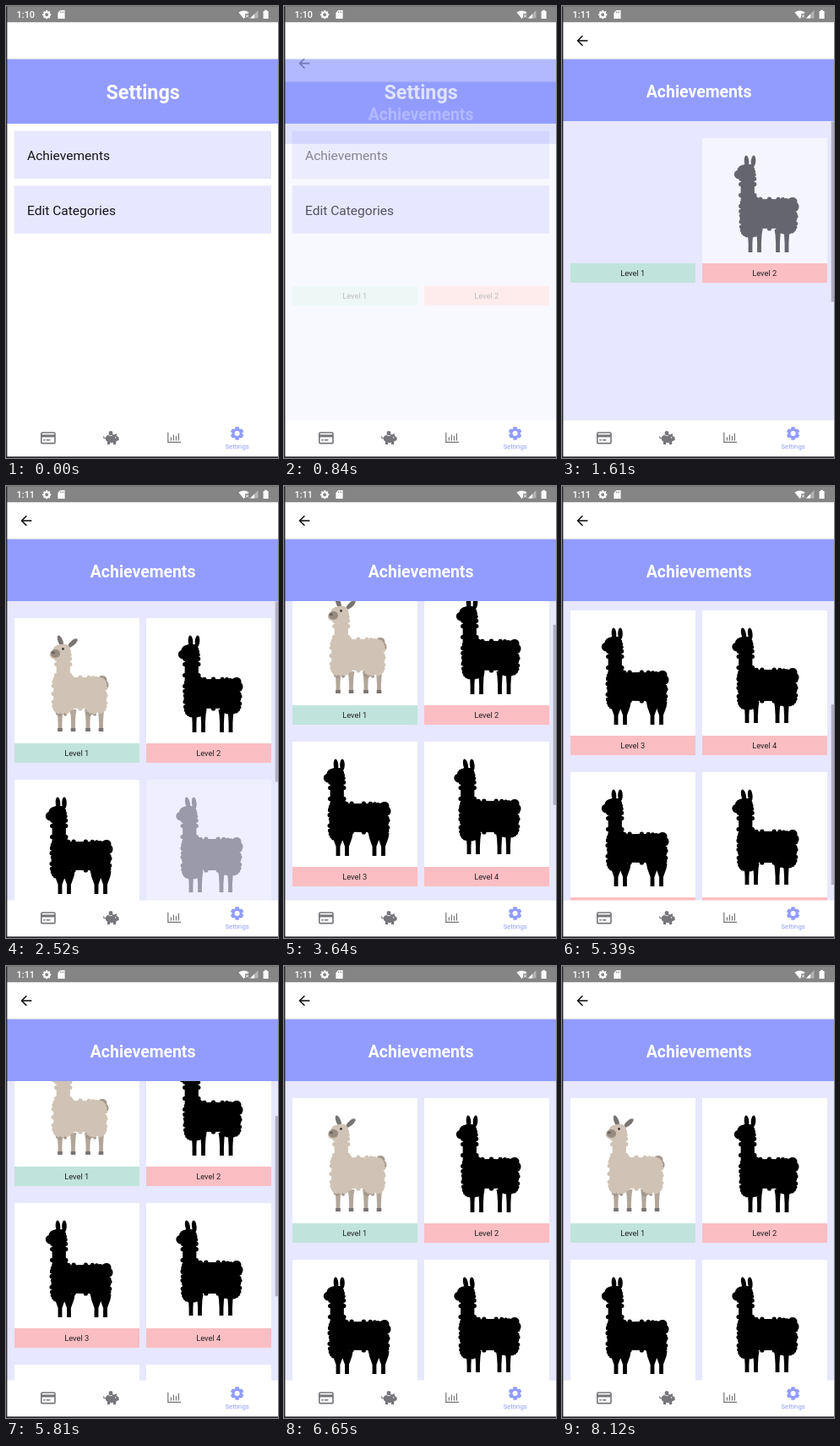
Recreate the animation shown at these times as an HTML page with a canvas. Size 322 by 534 pixels, loop 8.54 s.

```html
<!DOCTYPE html>
<html lang="en">
<head>
<meta charset="utf-8">
<title>Achievements</title>
<style>
html, body { margin: 0; width: 100%; height: 100%; overflow: hidden; background: #fff; }
canvas { display: block; width: 322px; height: 534px; }
</style>
</head>
<body>
<canvas id="stage"></canvas>
<script>
const W = 322, H = 534, LOOP = 8540, STEP = 70;
const BLUE = '#929cff', PALE = '#e7e7ff', GREY = '#75757a', EDGE = '#2a2a2e';
const dpr = window.devicePixelRatio || 1;
const stage = document.getElementById('stage');
const layer = document.createElement('canvas');
const [screen, sheet] = [stage, layer].map(c => {
  c.width = W * dpr;
  c.height = H * dpr;
  const x = c.getContext('2d');
  x.scale(dpr, dpr);
  return x;
});
let g = screen;

const ramp = (t, a, b) => Math.max(0, Math.min(1, (t - a) / (b - a)));
const smooth = p => p * p * (3 - 2 * p);
const drag = p => p + p * p * (1 - p) / 2;

function rect(x, y, w, h, color) {
  g.fillStyle = color;
  g.fillRect(x, y, w, h);
}

function text(s, x, y, size, color, weight = 400, align = 'center') {
  g.font = `${weight} ${size}px Roboto, sans-serif`;
  g.textAlign = align;
  g.fillStyle = color;
  g.fillText(s, x, y);
}

function trace(points) {
  g.beginPath();
  points.forEach(p => g.lineTo(p[0], p[1]));
}

function poly(points, color) {
  trace(points);
  g.fillStyle = color;
  g.fill();
}

function line(points, color, width) {
  trace(points);
  g.strokeStyle = color;
  g.lineWidth = width;
  g.stroke();
}

function oval(x, y, rx, ry, color, turn = 0) {
  g.beginPath();
  g.ellipse(x, y, rx, ry, turn, 0, 7);
  g.fillStyle = color;
  g.fill();
}

function gear(x, y, r, teeth, color) {
  g.beginPath();
  for (let i = 0; i < teeth; i++) {
    [[-.42, .75], [-.24, 1], [.24, 1], [.42, .75]].forEach(([a, k]) => {
      const turn = (i + a) * 2 * Math.PI / teeth - Math.PI / 2;
      g.lineTo(x + Math.cos(turn) * r * k, y + Math.sin(turn) * r * k);
    });
  }
  g.closePath();
  g.moveTo(x + r * .38, y);
  g.arc(x, y, r * .38, 0, 7);
  g.fillStyle = color;
  g.fill('evenodd');
}

// Rounded box from (x0, y0) to (x1, y1) with curls along its edge
function wool(x0, y0, x1, y1, color, curl = 2.6) {
  const cx = (x0 + x1) / 2, cy = (y0 + y1) / 2;
  const rx = (x1 - x0) / 2 - curl * .8, ry = (y1 - y0) / 2 - curl * .8;
  const bend = v => Math.sign(v) * Math.abs(v) ** .6;
  const n = Math.round((rx + ry) * .75);
  const points = Array.from({ length: n }, (_, i) => {
    const a = i / n * 2 * Math.PI;
    return [cx + rx * bend(Math.cos(a)), cy + ry * bend(Math.sin(a))];
  });
  poly(points, color);
  points.forEach(([x, y]) => oval(x, y, curl, curl, color));
}

const BREEDS = [
  { neck: 58, left: 43, right: 110, back: 68, ears: [-6, 16], legs: [54, 87], gap: 15.5, foot: 134, pale: true },
  { neck: 54, left: 43, right: 113, back: 70, ears: [-2, 7], legs: [57, 89.5], gap: 10.5, foot: 135 },
  { neck: 53, left: 41, right: 115, back: 71, ears: [-2, 6], legs: [54, 97], gap: 10.5, foot: 135, thigh: 7 },
  { neck: 51.5, left: 40, right: 113, back: 68, ears: [-4, 4.5], legs: [53, 89], gap: 10.5, foot: 133 }
];

function llama({ neck, left, right, back, ears, legs, gap, foot, thigh = 4, pale }) {
  const [coat, leg, dark, patch] = pale
    ? ['#d0c3b5', '#b3a699', '#787472', '#a4978c'] : Array(4).fill('#000');
  ears.forEach((dx, i) => {
    const x = neck - 1 + 7 * i, tip = pale ? 21 + 4 * i : 21;
    const tx = neck + dx - x, ty = tip - 34;
    oval(x + tx / 2, 34 + ty / 2, Math.hypot(tx, ty) / 2 + .5, 2.8, dark, Math.atan2(ty, tx));
  });
  oval(right - 6, back + 5, 5.5, 5, patch);
  oval(right - 2.5, back + 11, 4, 5, patch);
  legs.forEach(hip => [hip, hip + gap].forEach(x => {
    poly([[x - thigh, 108], [x + thigh, 108], [x + thigh - 1, 114], [x + 2.4, 124],
      [x + 2.4, foot], [x - 2.4, foot], [x - 2.4, 124], [x - thigh + 1, 114]], leg);
    if (pale) rect(x - 2.8, foot - 4, 5.6, 4, dark);
  }));
  if (pale) [56, 91].forEach(x => wool(x - 7, 104, x + 7, 116, patch, 2));
  wool(left + 1, back - 2, left + 27, pale ? 113 : 117, coat);
  wool(left + 4, back, right - 1, 109, coat);
  wool(right - 27, back + 2, right, 113, coat);
  wool(neck - 10.5, 31, neck + 10, 104, coat);
  oval(neck - 4, 38.5, 8.5, 7, coat);
  oval(neck - 10, 43, 6.2, 5.6, coat);
  if (pale) {
    oval(neck - 9.5, 42, 5.6, 5, '#988b80');
    oval(neck - 12, 41, 2, 1.4, '#6c625c');
    oval(neck - .5, 36.5, 1.4, 1.4, '#403a38');
  }
}

const scrollAt = t => Math.round(212 * (drag(ramp(t, 3460, 4380)) - drag(ramp(t, 5350, 6100))));

// Start of each picture's fade-in, by level
const LOADED = [1720, 1440, 2020, 2420, 4250, 4400];

function card(i, t, scroll) {
  const x = 10 + (i % 2) * 156, y = 156 + Math.floor(i / 2) * 191 - scroll;
  if (y > 490 || y + 171 < 136) return;
  const seen = ramp(t, LOADED[i], LOADED[i] + 300);
  if (seen > 0) {
    rect(x, y, 148, 148, '#fff');
    g.save();
    g.translate(x, y);
    llama(BREEDS[i < 4 ? i : i - 2]);
    g.restore();
    g.globalAlpha = 1 - seen;
    rect(x, y, 148, 148, PALE);
    g.globalAlpha = 1;
  }
  rect(x, y + 148, 148, 23, i ? '#fbbec2' : '#c0e4dc');
  text('Level ' + (i + 1), x + 73.7, y + 163.4, 9.33, '#222');
}

function thumbAlpha(t) {
  const show = (a, b) => t >= a ? 1 - ramp(t, b, b + 250) : 0;
  if (t < 3440) return show(1000, 2500);
  return t < 5330 ? show(3440, 4640) : show(5330, 6410);
}

function header(title, bottom, size, y) {
  rect(0, 19, W, 44, '#fff');
  rect(0, 63, W, bottom - 63, BLUE);
  rect(0, 62.5, W, .8, '#b4b8d8');
  text(title, 162.1, y, size, '#fff', 700);
}

function settings(t) {
  rect(0, 19, W, 472, '#fff');
  header('Settings', 139, 23.3, 110.4);
  const press = ramp(t, 440, 570) - ramp(t, 690, 940);
  ['Achievements', 'Edit Categories'].forEach((s, i) => {
    g.globalAlpha = i ? 1 : 1 - .8 * press;
    rect(9.7, 147.6 + 64.6 * i, 304.3, 56.6, PALE);
    text(s, 25, 182 + 65 * i, 15.55, '#15151c', 400, 'left');
    g.globalAlpha = 1;
  });
}

function achievements(t) {
  const scroll = scrollAt(t);
  rect(0, 136, W, 398, PALE);
  for (let i = 0; i < 6; i++) card(i, t, scroll);
  header('Achievements', 136, 19.45, 108);
  line([[30.4, 41], [18.6, 41]], '#111', 1.6);
  line([[24.4, 35.2], [18.6, 41], [24.4, 46.8]], '#111', 1.6);
  g.globalAlpha = thumbAlpha(t) * .25;
  rect(318.7, 136.5 + scroll * .608, 3.3, 213, '#000');
  g.globalAlpha = 1;
}

function statusBar(t) {
  rect(0, 0, W, 19.2, '#858585');
  text(t < 1000 ? '1:10' : '1:11', 12.6, 14.2, 10.9, '#fff', 500, 'left');
  gear(48.2, 10.2, 5.2, 8, '#fff');
  poly([[64.3, 5], [69.6, 5], [69.6, 15], [61.4, 15], [61.4, 8]], '#fff');
  for (let x = 64; x < 68; x += 1.8) rect(x, 6.3, .8, 2, '#858585');
  g.beginPath();
  g.moveTo(281.5, 15);
  g.lineTo(275.4, 7.6);
  g.quadraticCurveTo(281.5, 3.4, 287.6, 7.6);
  g.fillStyle = '#fff';
  g.fill();
  rect(283, 9.2, 5, 6, '#858585');
  line([[283.8, 10.2], [287, 13.6]], '#fff', 1);
  line([[287, 10.2], [283.8, 13.6]], '#fff', 1);
  poly([[298.5, 5], [298.5, 14.6], [289, 14.6]], '#b4b4b4');
  poly([[294, 9.6], [294, 14.6], [289, 14.6]], '#fff');
  rect(304.6, 6, 6, 9, '#fff');
  rect(306.2, 4.8, 2.8, 1.4, '#fff');
}

function tabBar() {
  rect(0, 489.5, W, 44.5, '#fff');
  g.strokeStyle = GREY;
  g.lineWidth = 1.6;
  g.beginPath();
  g.roundRect(41.8, 504, 16.2, 12.6, 1.2);
  g.stroke();
  rect(42, 506.4, 16, 3, GREY);
  rect(44.2, 512, 2.4, 1.5, GREY);
  rect(47.8, 512, 4.6, 1.5, GREY);

  oval(125, 511, 7.4, 5, GREY);
  oval(124, 504.4, 2.4, 2.4, GREY);
  poly([[127, 507], [131, 505], [130.8, 508], [133.6, 509.6], [133.6, 513], [129, 514.6]], GREY);
  rect(120, 513, 3.2, 5, GREY);
  rect(127, 513, 3.2, 5, GREY);
  line([[118.4, 510.5], [116, 510.5], [115.6, 508.4]], GREY, 1.2);
  line([[121.8, 507.6], [126, 507.6]], '#fff', .8);
  oval(129.6, 509.8, .8, .8, '#fff');

  line([[191.8, 503.8], [191.8, 515.4], [207, 515.4]], GREY, 1.2);
  [4, 7, 5.5, 8.5].forEach((h, i) => rect(194.8 + i * 3, 513.4 - h, 1.2, h, GREY));

  gear(273.6, 505, 8, 6, BLUE);
  text('Settings', 273.6, 523.2, 7.75, BLUE);
}

function draw(t) {
  g = screen;
  settings(t);
  const shown = smooth(ramp(t, 660, 1160));
  if (shown > 0) {
    g = sheet;
    g.clearRect(0, 0, W, H);
    achievements(t);
    g = screen;
    g.globalAlpha = shown;
    g.drawImage(layer, 0, 38 * (1 - shown), W, H);
    g.globalAlpha = 1;
  }
  tabBar();
  statusBar(t);
  rect(0, 0, 1.4, H, EDGE);
  rect(0, 532.3, W, 1.7, EDGE);
  rect(0, 0, W, .7, '#666');
}

const start = performance.now();
function tick() {
  const t = Math.max(0, performance.now() - start) % LOOP;
  draw(Math.floor(t / STEP) * STEP);
  requestAnimationFrame(tick);
}
tick();
</script>
</body>
</html>
```
